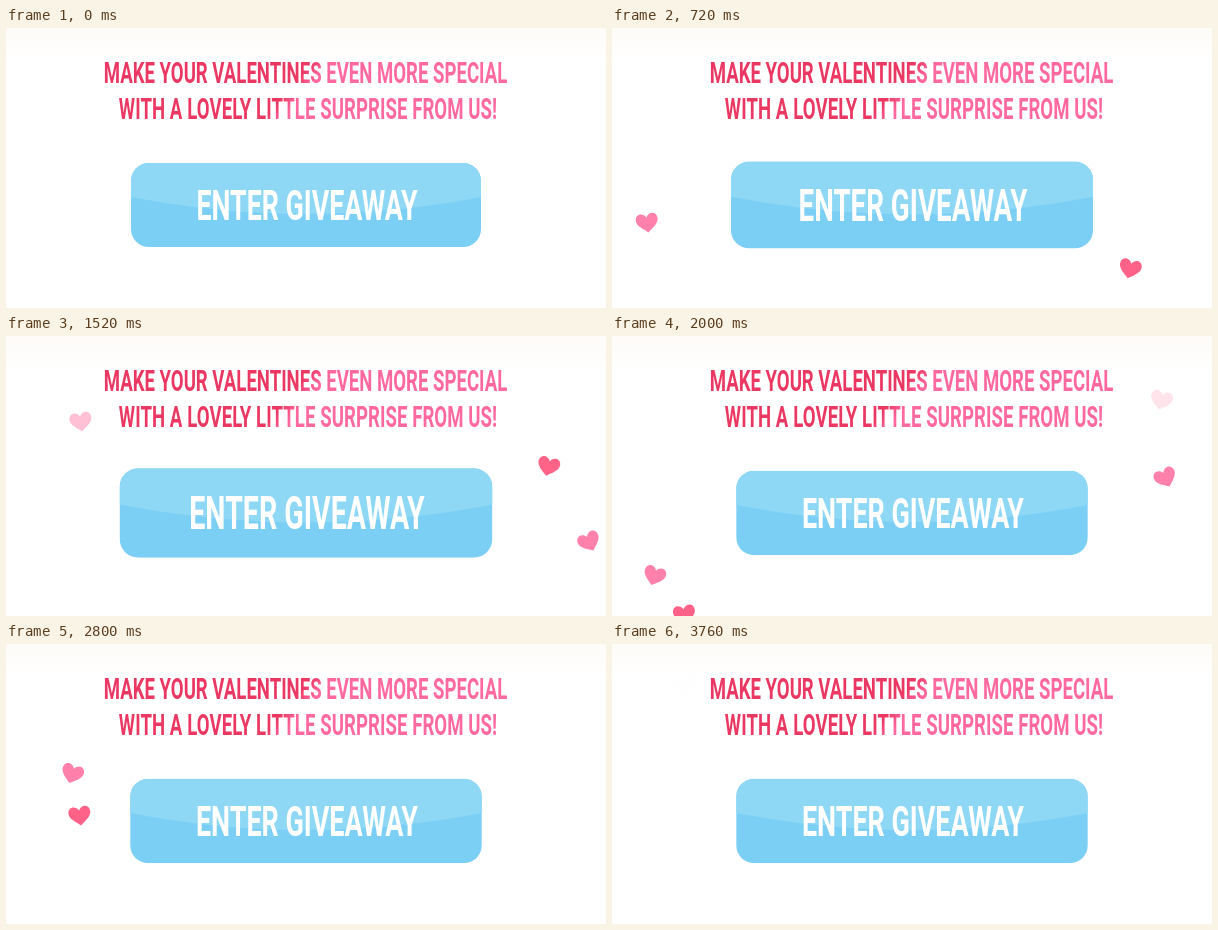
An HTML page for the animation above (3.84 s loop, 600 by 280 pixels).

```html
<!DOCTYPE html>
<html lang="en">
<head>
<meta charset="utf-8">
<title>Valentine giveaway</title>
<style>
  html, body { margin: 0; width: 100%; height: 100%; overflow: hidden; background: #fff; }
  svg { display: block; width: 600px; height: 280px; }
  text { font-family: Roboto, "Liberation Sans", Arial, sans-serif; font-weight: 700; text-anchor: middle; }
  .head { font-size: 29.5px; }
  .wide { letter-spacing: .13px; }
  .label { font-size: 42.6px; fill: #fff; }
</style>
</head>
<body>
<svg viewBox="0 0 600 280">
  <defs>
    <linearGradient id="sky" x2="0" y2="1">
      <stop stop-color="#fefbf8"/><stop offset="1" stop-color="#fff"/>
    </linearGradient>
    <linearGradient id="ink" gradientUnits="userSpaceOnUse" x1="285" y1="58" x2="297" y2="68">
      <stop stop-color="#ea3862"/><stop offset="1" stop-color="#ff69a0"/>
    </linearGradient>
    <mask id="words" maskUnits="userSpaceOnUse" x="0" y="0" width="600" height="110">
      <g class="head" fill="#fff" transform="translate(299.5 0) scale(.63 1)">
        <text y="55.5">MAKE YOUR VALENTINES EVEN MORE SPECIAL</text>
        <text class="wide" x="4" y="91.5">WITH A LOVELY LITTLE SURPRISE FROM US!</text>
      </g>
    </mask>
    <clipPath id="pill"><rect x="-175" y="-42" width="350" height="84" rx="18"/></clipPath>
  </defs>
  <rect width="600" height="36" fill="url(#sky)"/>
  <rect width="600" height="110" fill="url(#ink)" mask="url(#words)"/>
  <g id="button">
    <g clip-path="url(#pill)">
      <rect x="-175" y="-42" width="350" height="84" fill="#7bcff5"/>
      <path d="M-175-42H175V-8Q0 26-175-8Z" fill="#8ed8f6"/>
    </g>
    <text class="label" x="1.5" y="15" transform="scale(.63 1)">ENTER GIVEAWAY</text>
  </g>
  <g id="hearts"></g>
</svg>
<script>
const LOOP = 3840, STEP = 80, PULSE = 960;
const PINK = '#ff80ab', RED = '#ff6288';
const SHAPE = 'M0 9.5C-4 6-11 2-11-3.5C-11-10.5-3-11.5 0-5.5C3-11.5 11-10.5 11-3.5C11 2 4 6 0 9.5Z';

// x: sway centre, amp, period, peak: time of rightmost point, y at time at, speed in px/ms
const hearts = [
  { color: PINK, tilt: -8, x: 55.5, amp: 20.5, period: 1500, peak: 1440, y: 195, at: 720, speed: .1362 },
  { color: RED, tilt: 14, x: 532.5, amp: 21, period: 1750, peak: 1820, y: 241, at: 720, speed: .138 },
  { color: PINK, tilt: -25, x: 565.5, amp: 18.5, period: 1500, peak: 1460, y: 206, at: 1520, speed: .1335 },
  { color: PINK, tilt: 18, x: 56.5, amp: 20.5, period: 1750, peak: 3100, y: 240, at: 2000, speed: .1375 },
  { color: RED, tilt: -8, x: 56, amp: 18, period: 880, peak: 2820, y: 172, at: 2800, speed: .1335 }
];

const button = document.getElementById('button');
const layer = document.getElementById('hearts');
const wave = turns => Math.cos(turns * 2 * Math.PI);
const smooth = v => {
  const u = Math.min(1, Math.max(0, v));
  return u * u * (3 - 2 * u);
};

for (const h of hearts) {
  h.node = document.createElementNS('http://www.w3.org/2000/svg', 'path');
  h.node.setAttribute('d', SHAPE);
  h.node.setAttribute('fill', h.color);
  layer.append(h.node);
}

function draw(t) {
  const scale = 1 + .035 * (1 - wave(t / PULSE));
  button.setAttribute('transform', `translate(300 177) scale(${scale})`);
  for (const h of hearts) {
    const x = h.x + h.amp * wave((t - h.peak) / h.period);
    const y = h.y - h.speed * (t - h.at);
    h.node.setAttribute('transform', `translate(${x} ${y}) rotate(${h.tilt})`);
    h.node.setAttribute('opacity', smooth((y - 39) / 95));
  }
}

const start = performance.now();
function tick() {
  const t = (performance.now() - start) % LOOP;
  draw(Math.floor(t / STEP) * STEP);
  requestAnimationFrame(tick);
}
tick();
</script>
</body>
</html>
```
